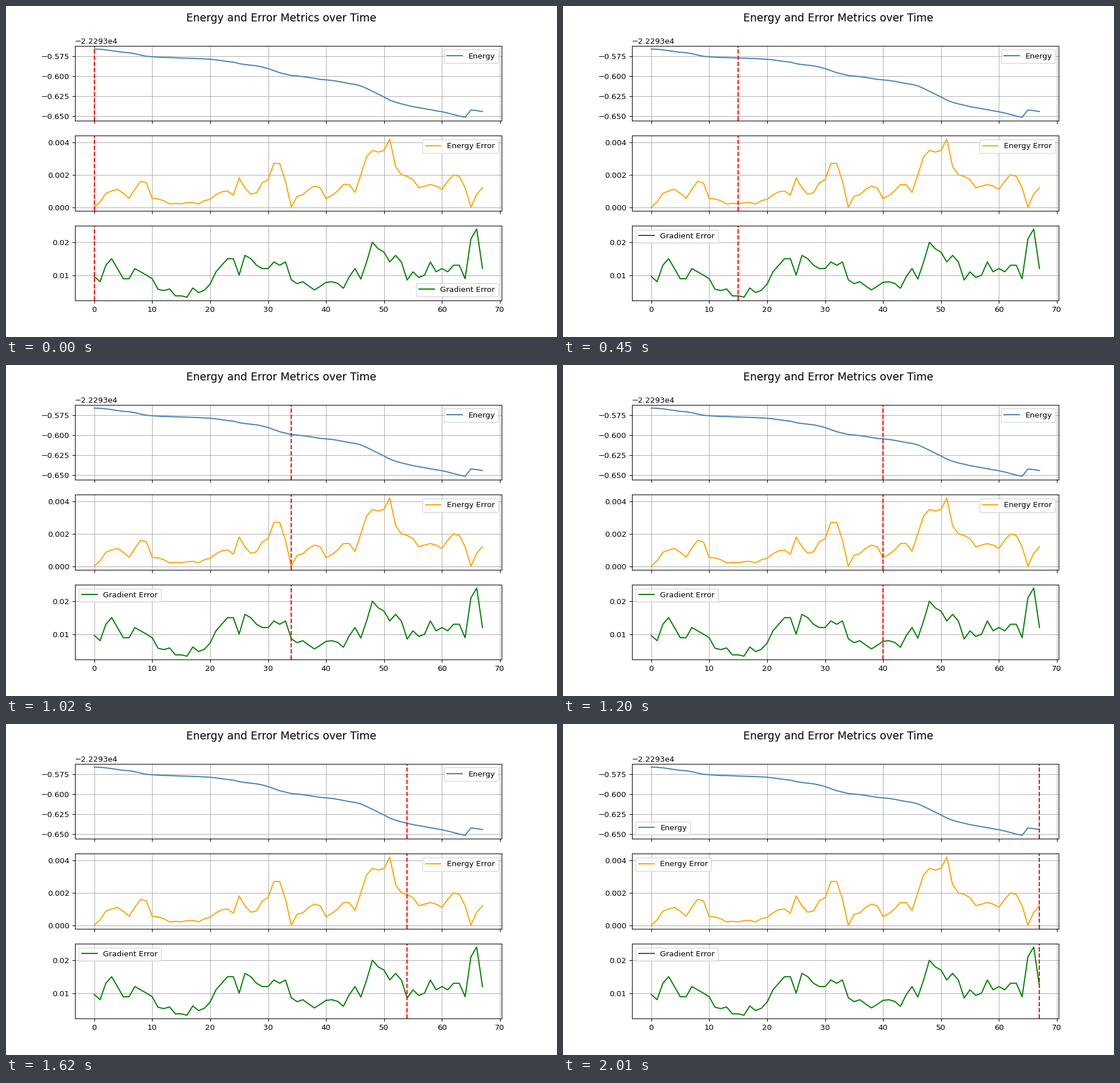
Animation, 966 px wide and 580 px high, one loop 2040 ms. Source, as a matplotlib script:

```python
import numpy as np
import matplotlib.pyplot as plt
from matplotlib.animation import FuncAnimation

DPI = 96.6
WIDTH, HEIGHT = 966, 580
STEP_MS = 30

# Drop below the base energy, in 1e-4
drop = [
    5664, 5666, 5673, 5683, 5694, 5704, 5709, 5721, 5738, 5753,
    5759, 5764, 5768, 5769, 5772, 5775, 5777, 5780, 5782, 5786,
    5790, 5798, 5808, 5818, 5826, 5845, 5856, 5864, 5872, 5887,
    5906, 5932, 5958, 5975, 5993, 5999, 6007, 6017, 6029, 6041,
    6047, 6054, 6065, 6079, 6093, 6103, 6122, 6154, 6189, 6225,
    6260, 6299, 6326, 6346, 6363, 6381, 6393, 6406, 6419, 6432,
    6444, 6460, 6479, 6498, 6513, 6422, 6430, 6442]

# Energy error, in 1e-5
energy_err = [
    0, 33, 86, 100, 110, 86, 55, 110, 160, 150,
    54, 51, 40, 20, 24, 21, 28, 30, 20, 40,
    49, 77, 95, 100, 74, 180, 120, 80, 89, 150,
    170, 270, 270, 160, 0, 67, 77, 110, 130, 120,
    53, 72, 100, 140, 140, 91, 200, 310, 350, 340,
    350, 420, 250, 200, 190, 170, 120, 130, 140, 130,
    110, 160, 200, 190, 120, 0, 80, 120]

# Gradient error, in 1e-4
grad_err = [
    96, 80, 130, 150, 120, 89, 89, 120, 110, 100,
    89, 57, 53, 58, 37, 37, 33, 61, 47, 54,
    73, 110, 130, 150, 150, 100, 160, 150, 130, 120,
    120, 140, 130, 140, 86, 74, 80, 67, 55, 66,
    78, 80, 75, 60, 95, 120, 88, 140, 200, 180,
    170, 140, 160, 140, 85, 110, 93, 100, 140, 110,
    120, 110, 130, 130, 89, 210, 240, 120]

series = [
    (-22293 - np.array(drop) * 1e-4, "steelblue", "Energy"),
    (np.array(energy_err) * 1e-5, "orange", "Energy Error"),
    (np.array(grad_err) * 1e-4, "green", "Gradient Error"),
]
steps = np.arange(len(drop))

# The tiny surplus keeps the pixel size from rounding down
fig, axes = plt.subplots(
    3, 1, sharex=True, dpi=DPI,
    figsize=((WIDTH + 1e-6) / DPI, (HEIGHT + 1e-6) / DPI))
fig.suptitle("Energy and Error Metrics over Time", fontsize=14)

cursors = []
for ax, (values, color, label) in zip(axes, series):
    ax.plot(steps, values, color=color, label=label)
    cursors.append(ax.axvline(0, color="red", linestyle="--"))
    ax.grid(True)
    # "best" moves the legend out of the cursor's way on each draw
    ax.legend(loc="best")


def update(step):
    for cursor in cursors:
        cursor.set_xdata([step, step])
    return cursors


anim = FuncAnimation(fig, update, frames=len(steps), interval=STEP_MS,
                     repeat=True, repeat_delay=0, blit=False)
plt.show()
```
